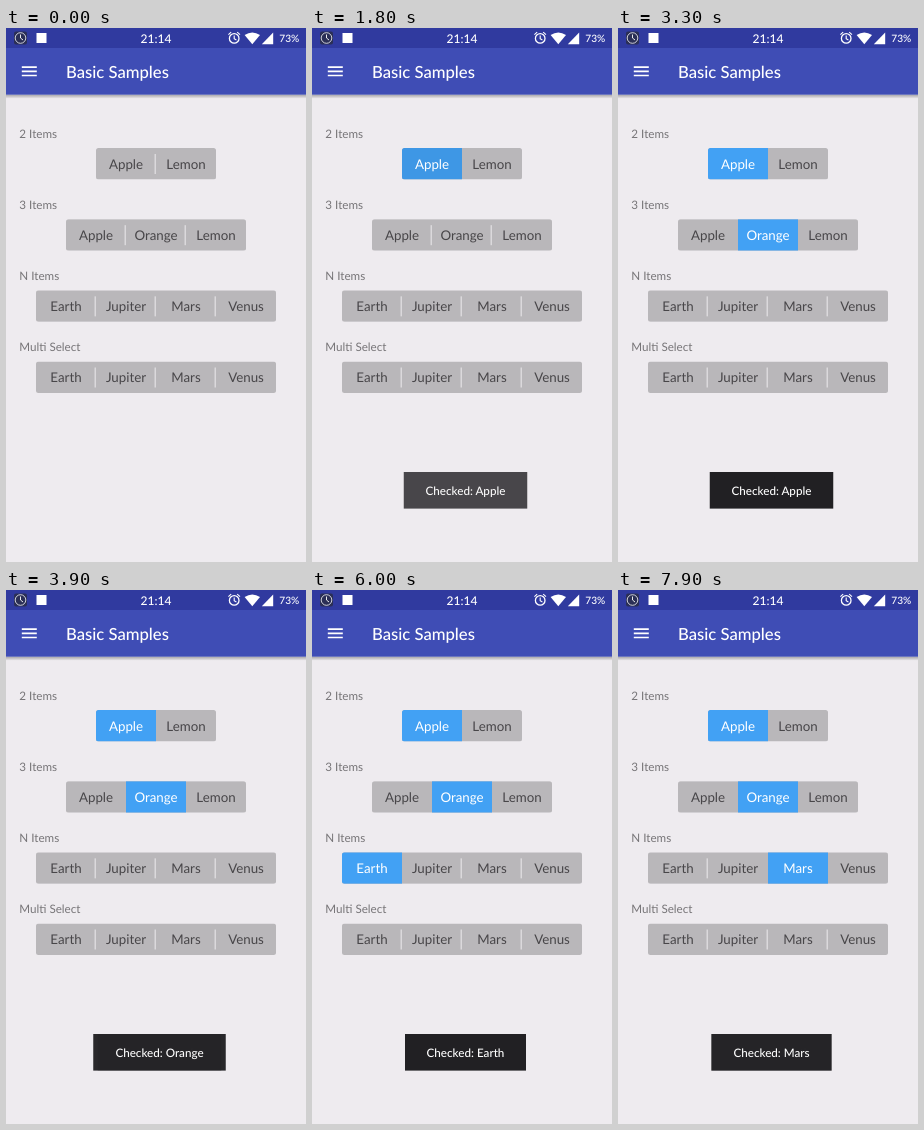
Recreate the animation shown at these times as an HTML page. Size 300 by 534 pixels, loop 8 s.

```html
<!DOCTYPE html>
<html lang="en">
<head>
<meta charset="utf-8">
<title>Basic Samples</title>
<style>
  html, body { margin: 0; width: 100%; height: 100%; overflow: hidden; background: #eeebef; }
  svg { display: block; width: 100%; height: 100%; font-family: Lato, sans-serif; text-rendering: geometricPrecision; }
  .label { font-size: 11.67px; fill: #777578; }
  .segment { font-size: 13.33px; text-anchor: middle; }
  .toast { font-size: 11.67px; font-weight: 500; fill: #fff; text-anchor: middle; }
  .status { fill: #fff; font-weight: 500; text-anchor: middle; }
  .line { fill: none; stroke: #fff; }
</style>
</head>
<body>
<svg id="stage" viewBox="0 0 300 534">
  <defs>
    <linearGradient id="shadow" x2="0" y2="1">
      <stop stop-color="#000" stop-opacity=".3"/>
      <stop offset="1" stop-color="#000" stop-opacity="0"/>
    </linearGradient>
  </defs>
  <rect width="300" height="534" fill="#eeebef"/>
  <rect y="66.7" width="300" height="4" fill="url(#shadow)"/>
  <rect width="300" height="66.7" fill="#3f4db5"/>
  <rect width="300" height="20" fill="#303a9f"/>

  <!-- status bar -->
  <rect x="8" y="3.5" width="13" height="13" rx="2" fill="#2b2f56"/>
  <circle class="line" cx="14.5" cy="10" r="5.3" stroke-width=".9" stroke-opacity=".85"/>
  <path class="line" d="M14.5 6.5V10L17 12" stroke-width=".9"/>
  <rect x="30.5" y="5" width="10" height="10" fill="#fff"/>
  <text class="status" x="150" y="14.7" font-size="12">21:14</text>
  <circle class="line" cx="228.2" cy="10.4" r="4.8" stroke-width="1.3"/>
  <path class="line" d="M228.2 7.5V10.6L230.4 12M222.4 6.6L225.2 4.2M231.2 4.2L234 6.6" stroke-width="1.1"/>
  <path d="M246.3 16.2L238.6 7Q246.3 1.8 254 7Z" fill="#fff"/>
  <path d="M255.8 16.2H267.2V4.6Z" fill="#fff"/>
  <text class="status" x="283.3" y="13.7" font-size="10.2">73%</text>

  <!-- toolbar -->
  <path class="line" d="M15.8 39.1H30.8M15.8 43.3H30.8M15.8 47.5H30.8" stroke-width="1.67"/>
  <text x="60" y="49.8" font-size="16.67" font-weight="500" fill="#fff">Basic Samples</text>
</svg>
<script>
const LOOP = 8000, STEP = 100;
const SEG_W = 60, SEG_H = 31.5;
const TOAST_FIRST = 1575, TOAST_HOLD = 2000, TOAST_FADE = 400;
const RIPPLE_TIME = 500;

const planets = ['Earth', 'Jupiter', 'Mars', 'Venus'];
const rows = [
  { label: '2 Items', items: ['Apple', 'Lemon'] },
  { label: '3 Items', items: ['Apple', 'Orange', 'Lemon'] },
  { label: 'N Items', items: planets },
  { label: 'Multi Select', items: planets }
];
// Each tap selects a segment; x and y are the touch point inside it.
const taps = [
  { at: 1500, row: 0, seg: 0, x: 34, y: 20, toastW: 123.5 },
  { at: 2800, row: 1, seg: 1, x: 34, y: 20, toastW: 132.5 },
  { at: 5200, row: 2, seg: 0, x: 43, y: 25, toastW: 121 },
  { at: 7000, row: 2, seg: 2, x: 34, y: 22, toastW: 120 }
];

const stage = document.getElementById('stage');
const clamp = v => Math.max(0, Math.min(1, v));

function add(parent, tag, attrs, text) {
  const el = document.createElementNS('http://www.w3.org/2000/svg', tag);
  set(el, attrs);
  if (text) el.textContent = text;
  return parent.appendChild(el);
}

function set(el, attrs) {
  for (const key in attrs) el.setAttribute(key, attrs[key]);
}

rows.forEach((row, i) => {
  const top = 120 + i * 71.17, width = row.items.length * SEG_W;
  add(stage, 'text', { class: 'label', x: 13.3, y: top - 10.5 }, row.label);

  const clip = add(stage, 'clipPath', { id: 'row' + i });
  add(clip, 'rect', { width, height: SEG_H, rx: 2.5 });
  const group = add(stage, 'g', {
    transform: `translate(${150 - width / 2} ${top})`, 'clip-path': `url(#row${i})`
  });
  add(group, 'rect', { width, height: SEG_H, fill: '#b9b7ba' });
  row.mark = add(group, 'rect', { width: SEG_W, height: SEG_H, fill: '#42a1f4' });

  const box = add(stage, 'clipPath', { id: 'box' + i });
  row.box = add(box, 'rect', { width: SEG_W, height: SEG_H });
  const pressed = add(group, 'g', { 'clip-path': `url(#box${i})` });
  row.ripple = add(pressed, 'circle', { fill: '#000' });

  row.dividers = row.items.slice(1).map((_, k) => add(group, 'rect', {
    x: (k + 1) * SEG_W - 1.5, y: 6, width: 1.5, height: 20, fill: '#dbd9dc'
  }));
  row.texts = row.items.map((name, k) => add(group, 'text', {
    class: 'segment', x: (k + .5) * SEG_W, y: 20.6
  }, name));
});

taps.forEach(tap => {
  tap.toast = add(stage, 'g', {});
  add(tap.toast, 'rect', {
    x: 153.5 - tap.toastW / 2, y: 444, width: tap.toastW, height: 36.6, fill: '#212023'
  });
  add(tap.toast, 'text', { class: 'toast', x: 153.5, y: 467 },
    'Checked: ' + rows[tap.row].items[tap.seg]);
});

function drawRow(row, tap, time) {
  const selected = tap ? tap.seg : -1;
  const x = selected * SEG_W;
  set(row.mark, { x, opacity: tap ? 1 : 0 });
  row.texts.forEach((el, k) => set(el, { fill: k === selected ? '#fff' : '#484649' }));
  row.dividers.forEach((el, k) => set(el, {
    opacity: k === selected || k + 1 === selected ? 0 : 1
  }));
  if (!tap) return set(row.ripple, { opacity: 0 });

  // The ripple grows while drifting from the touch point to the middle.
  const age = clamp((time - tap.at) / RIPPLE_TIME);
  const grow = clamp(age * 2);
  set(row.box, { x });
  set(row.ripple, {
    cx: x + tap.x + (SEG_W / 2 - tap.x) * grow,
    cy: tap.y + (SEG_H / 2 - tap.y) * grow,
    r: 16 + 20 * grow,
    opacity: .1 * (1 - age * age)
  });
}

function draw(time) {
  rows.forEach((row, i) => {
    drawRow(row, taps.filter(tap => tap.row === i && tap.at <= time).pop(), time);
  });
  taps.forEach((tap, i) => {
    const shown = time - TOAST_FIRST - i * TOAST_HOLD;
    const enter = clamp(shown / TOAST_FADE);
    const leave = clamp((shown - TOAST_HOLD) / TOAST_FADE);
    set(tap.toast, { opacity: (1 - (1 - enter) ** 2) * (1 - leave ** 2) });
  });
}

const start = performance.now();
function tick() {
  const time = (performance.now() - start) % LOOP;
  draw(Math.floor(time / STEP) * STEP);
  requestAnimationFrame(tick);
}
tick();
</script>
</body>
</html>
```
